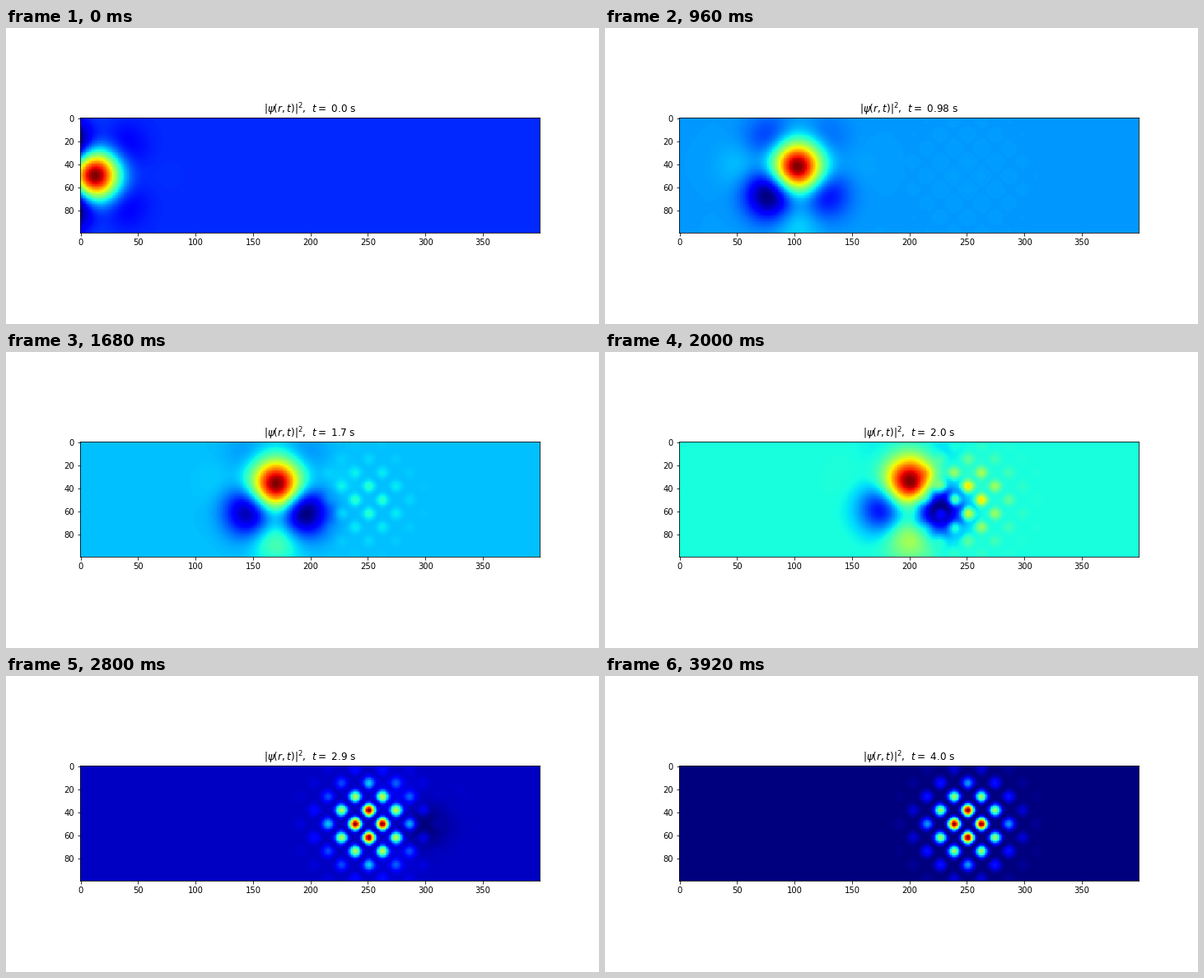
A matplotlib script that plays this animation: 720 by 360 pixels, repeating every 4000 ms.

```python
import numpy as np
import matplotlib.pyplot as plt
from matplotlib.animation import FuncAnimation

FRAMES, INTERVAL = 50, 80
T_END = 4.0
W, H = 400, 100

PACKET_SPEED = 100.0     # cells per second
PACKET_WIDTH2 = 1100.0
K = 2 * np.pi / 80       # wave number inside the packet
OMEGA = 1.0

SITE = 12.2              # spacing of the lattice sites
CX, CY = 250.8, 50.1
LATTICE_WIDTH2 = 900.0

x, y = np.meshgrid(np.arange(W), np.arange(H))


def gauss(dx, dy, width2):
    return np.exp(-(dx**2 + dy**2) / width2)


def lattice():
    dx, dy = x - CX, y - CY
    wave = (np.cos(np.pi * dx / SITE) - np.cos(np.pi * dy / SITE)) / 2
    return gauss(dx, dy, LATTICE_WIDTH2) * wave**2


def packet(t):
    dx, dy = x - PACKET_SPEED * t, y - 49.7
    wave = (np.sin(K * dx + OMEGA * t) + np.cos(K * dy + OMEGA * t)) / 2
    return gauss(dx, dy, PACKET_WIDTH2) * wave


LATTICE = lattice()


def field(t):
    # the trapped state takes over from the packet
    ratio = np.exp(-7 + 1.9 * t + 0.51 * t**2)
    return packet(t) + ratio * LATTICE


def title_text(t):
    return rf"$|\psi(r,t)|^2$,  $t=$ {t:.2} s"


fig, ax = plt.subplots(figsize=(10, 5), dpi=72, facecolor="white")
fig.subplots_adjust(left=0.125, right=0.9, bottom=0.125, top=0.88)
image = ax.imshow(field(0.0), cmap="jet", interpolation="nearest")
title = ax.set_title(title_text(0.0), fontsize=12)


def update(i):
    t = i * T_END / (FRAMES - 1)
    data = field(t)
    image.set_data(data)
    image.set_clim(data.min(), data.max())
    title.set_text(title_text(t))
    return image, title


anim = FuncAnimation(fig, update, frames=FRAMES, interval=INTERVAL,
                     repeat=True, repeat_delay=0, blit=False)
plt.show()
```
